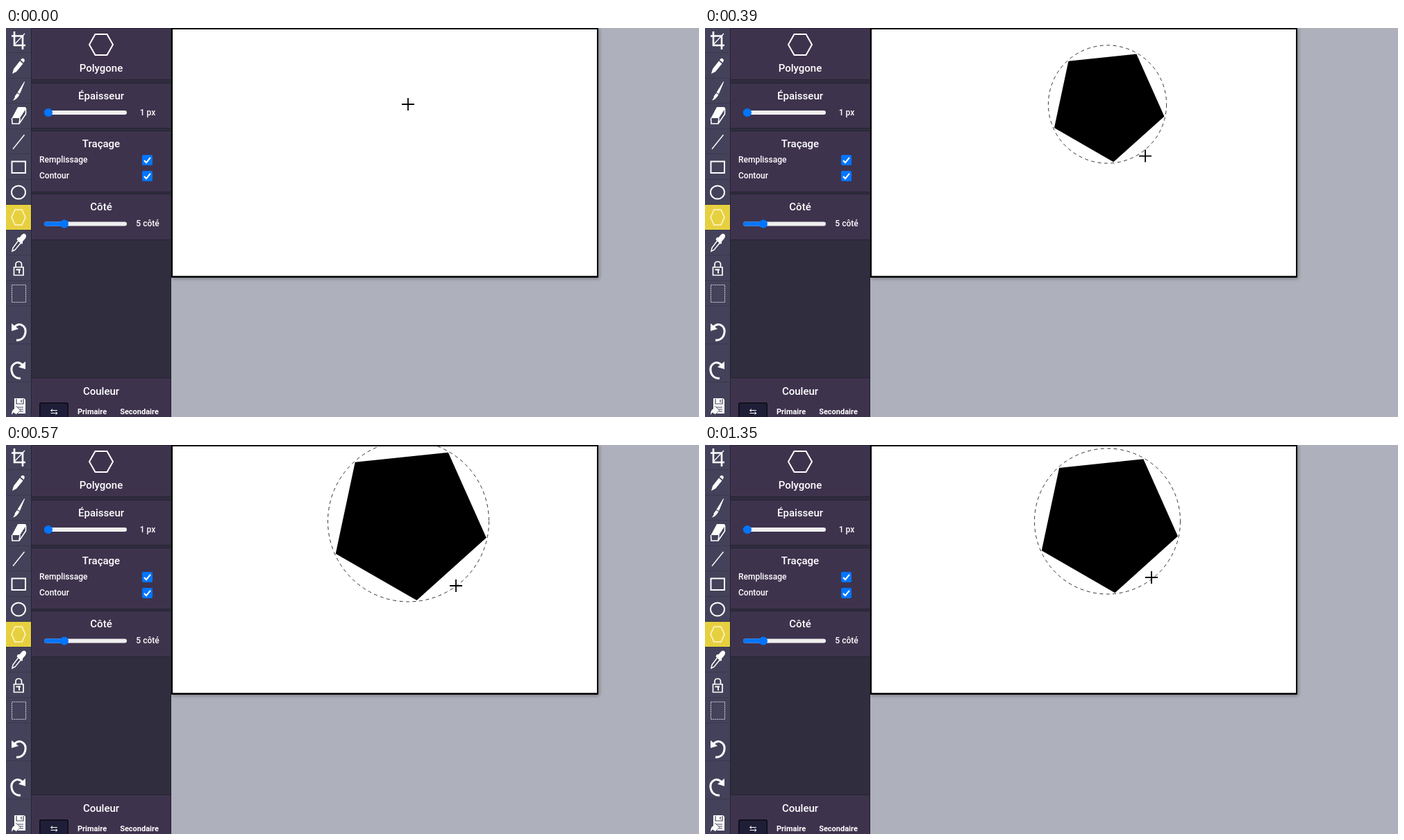
These frames come from a looping animation (998x561 px, 1380 ms). An HTML page with a canvas:

```html
<!DOCTYPE html>
<html lang="fr">
<head>
<meta charset="utf-8">
<title>Polygone</title>
<style>
html, body { margin: 0; width: 100%; height: 100%; overflow: hidden; background: #aeb0bb; }
canvas { display: block; }
</style>
</head>
<body>
<canvas id="stage" width="998" height="561"></canvas>
<script>
const ctx = document.getElementById('stage').getContext('2d');
const LOOP = 1380, STEP = 30;
const CENTER = { x: 579.5, y: 110 };
const BLUE = '#0075ff', WHITE = '#ffffff', CARD = '#3e334d', DARK = '#2f2d3e', EDGE = '#252331';

// time, circle radius, pointer x, pointer y
const KEYS = [
  [90, 0, 579, 110],
  [210, 45, 604, 152],
  [330, 66.5, 621, 168],
  [450, 102, 644, 198],
  [570, 116, 648, 203],
  [1020, 116, 648, 203],
  [1050, 115, 646, 201],
  [1350, 105, 643, 191]
];

function slope(i, c) {
  const a = KEYS[i], b = KEYS[i + 1];
  return a && b ? (b[c] - a[c]) / (b[0] - a[0]) : 0;
}

function tangent(i, c) {
  const p = slope(i - 1, c), n = slope(i, c);
  return p * n <= 0 ? 0 : 2 * p * n / (p + n);
}

// Monotone cubic interpolation of one key column
function sample(t, c) {
  const last = KEYS.length - 1;
  if (t <= KEYS[0][0]) return KEYS[0][c];
  if (t >= KEYS[last][0]) return KEYS[last][c];
  let i = 0;
  while (t >= KEYS[i + 1][0]) i++;
  const a = KEYS[i], b = KEYS[i + 1], h = b[0] - a[0], u = (t - a[0]) / h;
  const e = u * u * (3 - 2 * u);
  return a[c] + (b[c] - a[c]) * e
    + h * u * (1 - u) * ((1 - u) * tangent(i, c) - u * tangent(i + 1, c));
}

function rect(x, y, w, h, fill) {
  ctx.fillStyle = fill;
  ctx.fillRect(x, y, w, h);
}

function round(x, y, w, h, r, fill) {
  ctx.fillStyle = fill;
  ctx.beginPath();
  ctx.roundRect(x, y, w, h, r);
  ctx.fill();
}

function stroke(d, width = 2, color = WHITE) {
  ctx.strokeStyle = color;
  ctx.lineWidth = width;
  ctx.stroke(new Path2D(d));
}

function fill(d, color = WHITE) {
  ctx.fillStyle = color;
  ctx.fill(new Path2D(d));
}

function text(str, x, y, size, weight = 500, align = 'center') {
  ctx.font = `${weight} ${size}px Roboto, sans-serif`;
  ctx.textAlign = align;
  ctx.fillStyle = WHITE;
  ctx.fillText(str, x, y);
}

function card(y, h) {
  rect(37, y, 200, h, EDGE);
  rect(37, y + 1, 200, h - 2, CARD);
}

function slider(y, thumb) {
  round(55, y - 3, 119, 6, 3, '#efefef');
  round(55, y - 3, thumb - 55, 6, 3, BLUE);
  round(thumb - 6, y - 6, 12, 12, 6, BLUE);
}

function checkbox(y) {
  round(196, y, 15, 15, 2, BLUE);
  stroke(`M199 ${y + 8} l3 3.2 l6 -7.4`, 2.1);
}

function drawTools() {
  rect(0, 0, 36, 561, '#44425a');
  for (let i = 1; i <= 11; i++) rect(0, Math.round(i * 36.45) - 1, 36, 1, '#3a384d');
  rect(0, 455, 36, 1, '#3a384d');
  rect(0, 510, 36, 1, '#3a384d');
  rect(0, 255, 36, 36, '#e6d040');
  rect(36, 0, 1, 561, EDGE);

  // crop
  stroke('M12 5 V25 H28 M8 11.5 H24 V31', 2.6);
  stroke('M27 8 L12 24', 1.2);
  // pencil
  fill('M9 66 L11 59 L20 47.5 L24.5 51.5 L15 63 Z M21 46 L23 44 Q26 43 27 46.5 L25.5 50 Z');
  // brush
  fill('M26.5 77 L27 78 L20 95 L16.5 93 Z M16 94 L19.5 96 Q16 103 10 104.5 Q13 101 13 98 Z');
  // eraser
  fill('M17 114 H28 L29 116 L20 130 H8.5 Z');
  stroke('M8.5 130 L9 138 H19 L28.5 124 V116 M20 130 L19 138', 1.6);
  // line, rectangle, ellipse, polygon
  stroke('M10 174.5 L26.5 154', 1.4);
  stroke('M8.5 192.5 H28 V209 H8.5 Z', 2);
  stroke('M8 237 a10 9.5 0 1 0 20 0 a10 9.5 0 1 0 -20 0', 2);
  stroke('M8 273 L13 262 H23 L28 273 L23 284 H13 Z', 1.6, '#fff6c8');
  // eyedropper
  stroke('M19 305 L10 317 L9 322 L13 320 L22 309', 1.5);
  fill('M17 302 L19.5 302 L23 298 Q26 295 28.5 298 Q30 301 27 304.5 L24 308 L24 311 L22 311.5 L15.5 305 Z');
  // fill
  stroke('M11.5 345 H25 V356.5 H11.5 Z M14 345 V341 Q14 337 18.2 337 Q22.5 337 22.5 341 V345', 1.7);
  stroke('M14.5 348.5 H21 M19 348 V354', 1.8);
  // selection
  ctx.setLineDash([2, 1]);
  stroke('M8.5 370.5 H28.5 V395.5 H8.5 Z', 1.1, '#d0cfd8');
  ctx.setLineDash([]);
  // undo and redo
  const arrow = 'M12 431 C21 423 29 431 28 439 C27 447 21 451 15 450';
  const head = 'M8 426 L8 437 L18 434 Z';
  stroke(arrow, 3);
  fill(head);
  ctx.save();
  ctx.translate(36, 55);
  ctx.scale(-1, 1);
  stroke(arrow, 3);
  fill(head);
  ctx.restore();
  // save
  fill('M12 534 H26 L28 536 V556 H12 Z');
  stroke('M15 535 V542 H25 V535 M22 536 V540 M16 547 H25 M18 550 H25 M20 553 H25', 1.2, '#44425a');
  fill('M8 558 Q8 549 14 549 V545 L21 551.5 L14 558 V554 Q10 554 8 558 Z');
  stroke('M14 545 L21 551.5 L14 558', 0.8, '#44425a');
}

function drawPanel() {
  rect(37, 0, 201, 561, DARK);
  card(0, 75);
  card(79, 66);
  card(148, 89);
  card(239, 67);
  card(504, 60);
  rect(237, 0, 1, 561, EDGE);

  stroke('M120 24 L128.5 9 H145.5 L154 24 L145.5 39 H128.5 Z', 2);
  text('Polygone', 137, 63, 15);
  text('Épaisseur', 137, 103, 15);
  text('Traçage', 137, 172, 15);
  text('Côté', 137, 263, 15);
  text('Couleur', 137, 529, 15);
  slider(122, 61);
  slider(282.5, 84);
  text('1 px', 204, 126, 12);
  text('5 côté', 204, 286, 12);
  text('Remplissage', 48, 194, 12, 500, 'left');
  text('Contour', 48, 217, 12, 500, 'left');
  checkbox(183);
  checkbox(206);

  round(48, 540, 42, 30, 3, '#0c0b14');
  round(49.5, 541.5, 39, 30, 2, '#1f1e38');
  stroke('M64.5 551.5 H74 M67 549.5 L64.5 551.5 L67 553.5 M64.5 555.5 H74 M71.5 553.5 L74 555.5 L71.5 557.5', 1);
  text('Primaire', 124, 557, 11, 700);
  text('Secondaire', 192, 557, 11, 700);
}

function drawPaper() {
  rect(238, 0, 760, 561, '#aeb0bb');
  ctx.save();
  ctx.shadowColor = 'rgba(0,0,0,.4)';
  ctx.shadowBlur = 5;
  ctx.shadowOffsetX = ctx.shadowOffsetY = 1;
  rect(238, 0, 615, 360, '#000');
  ctx.restore();
  rect(240, 2, 611, 355.5, WHITE);
}

function drawShape(r) {
  if (r <= 2) return;
  const { x, y } = CENTER;
  ctx.save();
  ctx.beginPath();
  ctx.rect(240, 2, 611, 355.5);
  ctx.clip();
  ctx.beginPath();
  for (let i = 0; i < 5; i++) {
    const a = (84 + i * 72) * Math.PI / 180;
    ctx.lineTo(x + (r - 1.3) * Math.cos(a), y + (r - 1.3) * Math.sin(a));
  }
  ctx.fillStyle = '#000';
  ctx.fill();
  ctx.setLineDash([5, 4.5]);
  ctx.strokeStyle = '#333';
  ctx.lineWidth = 1;
  ctx.beginPath();
  ctx.arc(x, y, r, 0, Math.PI * 2);
  ctx.stroke();
  ctx.restore();
}

function draw(now) {
  const t = Math.floor((now % LOOP) / STEP) * STEP;
  drawPaper();
  drawPanel();
  drawTools();
  drawShape(sample(t, 1));
  const x = sample(t, 2), y = sample(t, 3);
  stroke(`M${x - 9} ${y} h18 M${x} ${y - 9} v18`, 1.8, '#000');
}

let start;
function tick(now) {
  start ??= now;
  draw(now - start);
  requestAnimationFrame(tick);
}
draw(0);
requestAnimationFrame(tick);
</script>
</body>
</html>
```
